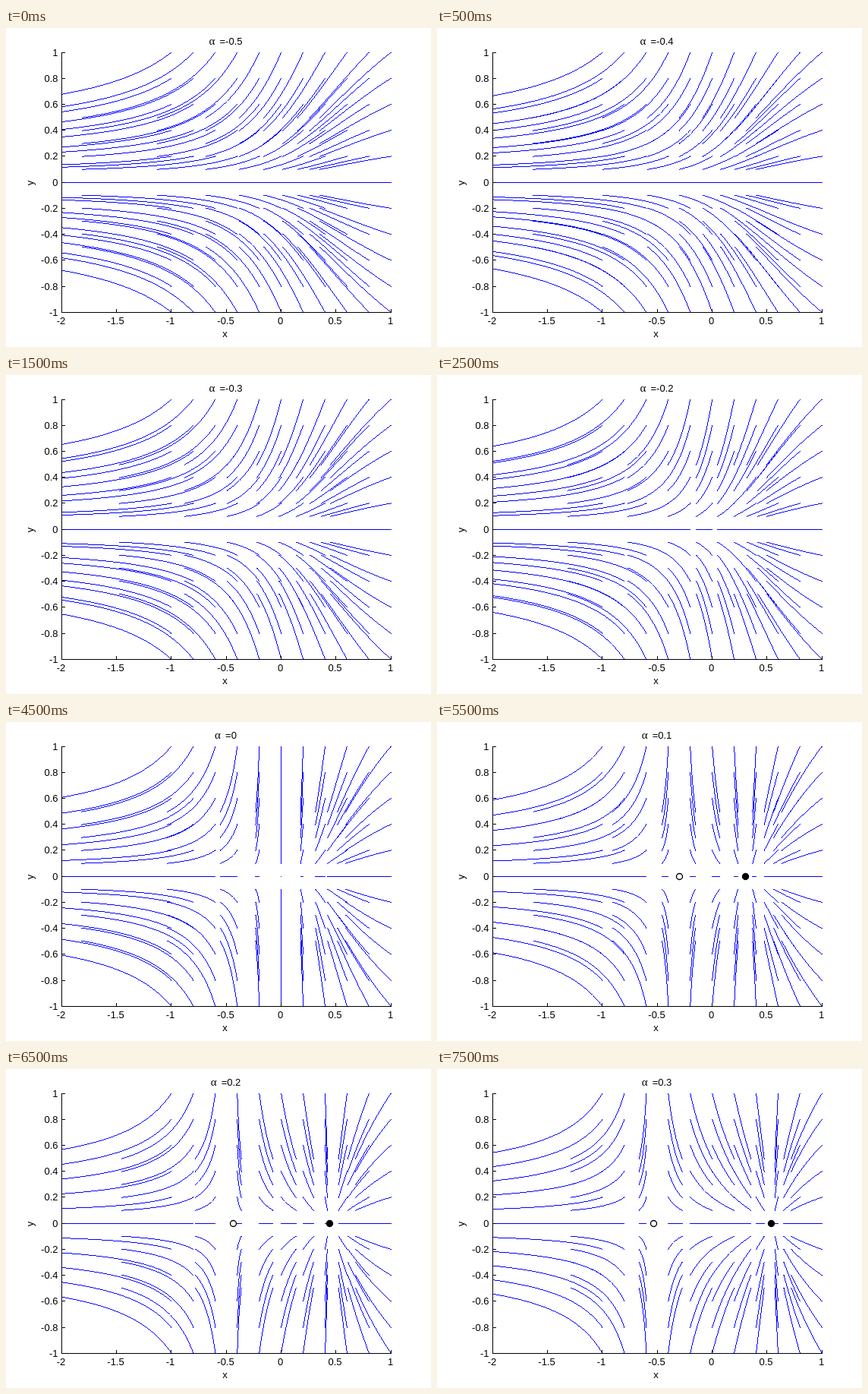
These frames come from a looping animation (560 px wide and 420 px high, 8 s). An HTML page with a canvas:

```html
<!DOCTYPE html>
<html lang="en">
<head>
<meta charset="utf-8">
<title>Saddle-node bifurcation</title>
<style>
html, body { margin: 0; width: 100%; height: 100%; overflow: hidden; background: #fff; }
canvas { display: block; }
</style>
</head>
<body>
<canvas id="stage" width="560" height="420"></canvas>
<script>
const ctx = document.getElementById('stage').getContext('2d');
const LOOP = 8000, SPAN = 0.7, STEPS = 40;
const LEFT = 73, RIGHT = 507, TOP = 32, BOTTOM = 374;
const FONT = '13px "Liberation Sans", Arial, sans-serif';
const SYMBOL_FONT = '15px "Liberation Serif", serif';

// The plot area lies on fractions of a pixel
const px = x => 72.8 + (x + 2) * 434 / 3;
const py = y => 202.65 - y * 171.15;

// Exact solution of x' = alpha - x^2
function flowX(x0, alpha, t) {
  const a = Math.sqrt(Math.abs(alpha));
  let c = 1, s = t;
  if (alpha > 0) { c = Math.cosh(a * t); s = Math.sinh(a * t) / a; }
  if (alpha < 0) { c = Math.cos(a * t); s = Math.sin(a * t) / a; }
  return (x0 * c + alpha * s) / (c + x0 * s);
}

function dot(x, y) {
  if (Math.round(x) >= LEFT) ctx.fillRect(Math.round(x), Math.round(y), 1, 1);
}

// Unsmoothed line: one pixel per column, or per row when steep
function pixelLine(p, q) {
  const dx = q.x - p.x, dy = q.y - p.y;
  if (Math.abs(dx) >= Math.abs(dy)) {
    const end = Math.max(p.x, q.x);
    for (let x = Math.ceil(Math.min(p.x, q.x)); x <= end; x++) dot(x, p.y + dy * (x - p.x) / (dx || 1));
  } else {
    const end = Math.max(p.y, q.y);
    for (let y = Math.ceil(Math.min(p.y, q.y)); y <= end; y++) dot(p.x + dx * (y - p.y) / dy, y);
  }
}

function trajectory(x0, y0, alpha) {
  const pointAt = t => ({ x: px(flowX(x0, alpha, t)), y: py(y0 * Math.exp(-t)) });
  let last = pointAt(0);
  dot(last.x, last.y);
  for (let i = 1; i <= STEPS; i++) {
    const next = pointAt(SPAN * i / STEPS);
    pixelLine(last, next);
    last = next;
  }
  dot(last.x, last.y);
}

function label(text, x, y, align) {
  ctx.textAlign = align;
  ctx.fillText(text, x, y);
}

function drawAxes() {
  ctx.fillStyle = '#000';
  ctx.font = FONT;
  ctx.fillRect(LEFT, TOP, 1, BOTTOM - TOP + 1);
  ctx.fillRect(LEFT, BOTTOM, RIGHT - LEFT + 1, 1);
  for (let i = -4; i <= 2; i++) {
    const x = Math.round(px(i / 2));
    ctx.fillRect(x, BOTTOM - 4, 1, 4);
    label(String(i / 2), x - 0.5, 390, 'center');
  }
  for (let i = -5; i <= 5; i++) {
    const y = Math.round(py(i / 5));
    ctx.fillRect(LEFT, y, 5, 1);
    label(String(i / 5), 68.5, y + 5, 'right');
  }
  label('x', 288.5, 407, 'center');
  ctx.save();
  ctx.translate(36, 204);
  ctx.rotate(-Math.PI / 2);
  label('y', 0, 0, 'center');
  ctx.restore();
}

function drawTitle(alpha) {
  const value = '=' + alpha;
  ctx.font = FONT;
  const half = (ctx.measureText(value).width + 14) / 2;
  label(value, 289.5 + half, 22, 'right');
  ctx.font = SYMBOL_FONT;
  label('α', 289.5 - half, 22, 'left');
}

function marker(x, fill) {
  ctx.beginPath();
  ctx.arc(Math.round(px(x) + 0.4) + 0.5, Math.round(py(0)) + 0.5, 4, 0, 2 * Math.PI);
  ctx.fillStyle = fill;
  ctx.strokeStyle = '#000';
  ctx.lineWidth = 1.4;
  ctx.fill();
  ctx.stroke();
}

function draw(alpha) {
  ctx.fillStyle = '#fff';
  ctx.fillRect(0, 0, 560, 420);
  ctx.fillStyle = '#00f';
  for (let j = -5; j <= 5; j++) {
    for (let i = -5; i <= 5; i++) trajectory(i / 5, j / 5, alpha);
  }
  drawAxes();
  drawTitle(alpha);
  if (alpha > 0) {
    const root = Math.sqrt(alpha - 0.01);
    marker(-root, '#fff');
    marker(root, '#000');
  }
}

const start = performance.now();
let shown = null;
function frame() {
  const time = (performance.now() - start) % LOOP;
  const alpha = (Math.floor((time + 500) / 1000) - 5) / 10;
  if (alpha !== shown) draw(shown = alpha);
  requestAnimationFrame(frame);
}
frame();
</script>
</body>
</html>
```
